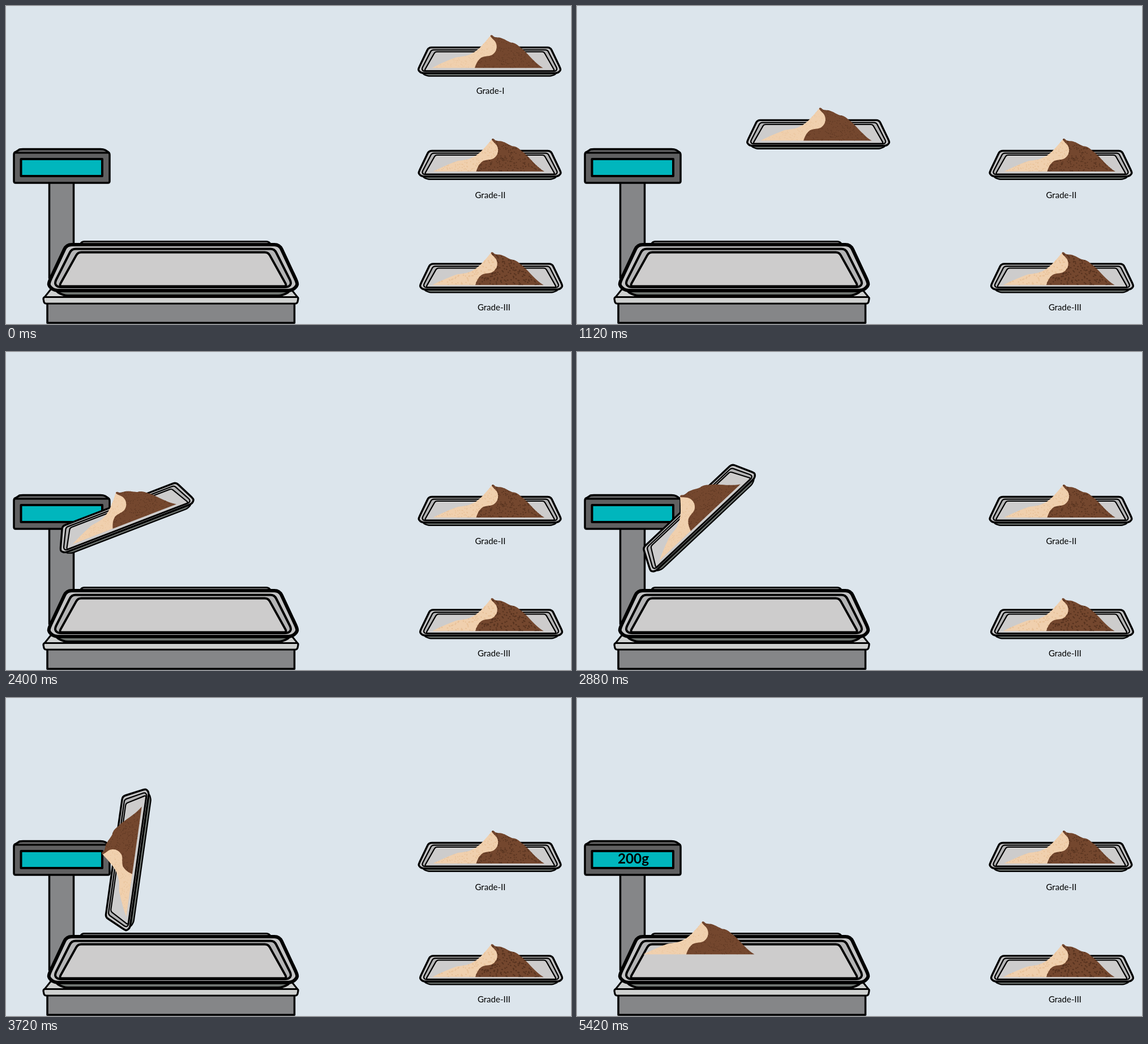
These frames come from a looping animation (998 px wide and 561 px high, 5460 ms). An HTML page:

```html
<!DOCTYPE html>
<html lang="en">
<head>
<meta charset="utf-8">
<title>Weighing a sample</title>
<style>
  html, body { margin: 0; width: 100%; height: 100%; overflow: hidden; background: #dce5ec; }
  svg { display: block; width: 100vw; height: 100vh; }
  text { font-family: Lato, "Open Sans", sans-serif; font-size: 15px; text-anchor: middle; }
  .line { stroke: #000; stroke-linejoin: round; stroke-linecap: round; }
</style>
</head>
<body>
<svg viewBox="0 0 998 561">
  <defs>
    <path id="light" d="M752 109.3 C764 103 778 97 790 92.5 C797 89 806 90 814 87.5 C828 83 836 75 843 67 C849 61 853 55 857 51 L868 66 L868 84 L838 109.3 Z"/>
    <path id="dark" d="M855.5 53 C856 50.5 859 50.5 861 53.5 C865 56.5 871 54.5 876 57 C882 59 887 63 892 64.5 C899 65 903 68 907 72 C916 78 922 86 929 93 C935 99 941 105 948.5 109.3 H828 C830 103 832 98 837 93 C843 87 852 90 859 86 C866 81 868 74 866 67 C864 60 858 58 855.5 53 Z"/>
    <clipPath id="lightClip"><use href="#light"/></clipPath>
    <clipPath id="darkClip"><use href="#dark"/></clipPath>
    <g id="tray"></g>
    <g id="smallTray"><use href="#tray" transform="translate(727 71.500) scale(.572 .56) translate(-73 -418)"/></g>
  </defs>

  <rect width="998" height="561" fill="#dce5ec"/>

  <g class="line">
    <path d="M76.500 310 H119.500 V425 L76.500 480 Z" fill="#858688" stroke-width="3.500"/>
    <path d="M14 262 Q14 258 18 257 L24 253 Q26 252.500 30 252.500 H167 Q172 252.500 175 254 L181 258 Q183 259 183 263 V309 Q183 312 180 312 H17 Q14 312 14 309 Z" fill="#606061" stroke-width="3.500"/>
    <path d="M17 259 H181" fill="none" stroke-width="3"/>
    <rect x="26.500" y="270" width="143.500" height="30" fill="#00b6bd" stroke-width="4"/>
    <path d="M131 421 Q133 415.500 138 415.500 H460 Q465 415.500 468 421 Z" fill="#a9aaab" stroke-width="3"/>
    <path d="M79 500 H504 L516 515 H67 Z" fill="#ced0cf" stroke-width="3"/>
    <rect x="73" y="523" width="436.500" height="36" fill="#858688" stroke-width="3.500"/>
    <path d="M69 513.500 H514 Q516 513.500 516 517 L515 522 Q514 525 511 525 H71 Q68 525 67 522 L66 517 Q66 513.500 69 513.500 Z" fill="#ced0cf" stroke-width="3.200"/>
  </g>
  <use href="#tray"/>

  <use href="#smallTray" x=".5" y="182.300"/>
  <g id="pile2" transform="translate(2.500 182.700)"></g>
  <use href="#smallTray" x="3" y="381.700"/>
  <g id="pile3" transform="translate(1 383)"></g>

  <text id="label1" x="855.500" y="154.500">Grade-I</text>
  <text x="855.500" y="339">Grade-II</text>
  <text x="862" y="537">Grade-III</text>

  <g id="sample">
    <use href="#smallTray"/>
  </g>
  <g id="pile1"></g>
  <g id="poured" transform="translate(-635 343)"></g>
  <text id="reading" x="99.500" y="292" style="font-size:24.300px;font-weight:700">200g</text>
</svg>
<script>
const $ = id => document.getElementById(id);
const clamp = v => Math.min(1, Math.max(0, v));

// Closed symmetric outline with rounded corners; points are [half width, y] down the right side
function outline(side, r) {
  const mid = 295;
  const pts = [...side.map(([w, y]) => [mid + w, y]),
               ...side.slice().reverse().map(([w, y]) => [mid - w, y])];
  const toward = (a, b) => {
    const k = Math.min(.5, r / Math.hypot(b[0] - a[0], b[1] - a[1]));
    return [a[0] + (b[0] - a[0]) * k, a[1] + (b[1] - a[1]) * k];
  };
  return pts.map((p, i) => {
    const prev = pts[(i + pts.length - 1) % pts.length], next = pts[(i + 1) % pts.length];
    return `${i ? 'L' : 'M'}${toward(p, prev)}Q${p} ${toward(p, next)}`;
  }).join('') + 'Z';
}

const layer = (side, r, fill, width) =>
  `<path class="line" d="${outline(side, r)}" fill="${fill}" stroke-width="${width}"/>`;

$('tray').innerHTML =
  layer([[208, 500], [203, 506], [190, 511]], 4, '#6f7571', 4) +
  layer([[188, 421], [219.5, 488], [219, 494], [210, 502]], 9, '#c4c4c5', 6) +
  layer([[179, 428.5], [209.5, 489], [204, 496]], 7, '#b4b4b5', 4) +
  layer([[168, 434.5], [201.5, 494.5]], 6, '#cdcccc', 3.8);

function random(seed) {
  return () => (seed = (seed * 16807) % 2147483647) / 2147483647;
}

function specks(count, seed) {
  const rnd = random(seed);
  let d = '';
  for (let i = 0; i < count; i++)
    d += `M${(750 + rnd() * 200).toFixed(1)} ${(51 + rnd() * 58).toFixed(1)}l${(rnd() * .8).toFixed(1)} .3`;
  return d;
}

function pile(count, size, seed) {
  const d = specks(count, seed);
  const dots = (clip, color) =>
    `<g clip-path="url(#${clip})"><path d="${d}" stroke="${color}" stroke-width="${size}" stroke-linecap="round"/></g>`;
  return '<use href="#light" fill="#f0d0ae"/>' + dots('lightClip', '#e8c198') +
         '<use href="#dark" fill="#74472e"/>' + dots('darkClip', '#57331f');
}

$('pile1').innerHTML = $('poured').innerHTML = pile(620, 1, 4711);
$('pile2').innerHTML = pile(560, 1.6, 1234);
$('pile3').innerHTML = pile(460, 2.2, 9182);

const LOOP = 5460;
const MOVE = { start: 115, length: 1713, dx: -649, dy: 194.5 };
const TURN = { start: 1945, length: 1950, angle: -90 };
const SINK = { start: 3920, length: 1000, drop: 56 };
const POURED = 4880, CLEARED = 5420;

const progress = (t, part) => clamp((t - part.start) / part.length);
const ease = p => p < .5 ? 2 * p * p : 1 - 2 * (1 - p) * (1 - p);
const show = (id, on) => $(id).setAttribute('visibility', on ? 'visible' : 'hidden');

function draw(t) {
  const u = ease(progress(t, MOVE));
  const angle = TURN.angle * progress(t, TURN);
  const sink = progress(t, SINK);
  const pose = `translate(${MOVE.dx * u} ${MOVE.dy * u}) rotate(${angle} 854 87.5)`;

  $('sample').setAttribute('transform', pose);
  $('pile1').setAttribute('transform', `translate(0 ${SINK.drop * sink}) ${pose}`);
  $('pile1').setAttribute('opacity', 1 - sink);

  show('label1', t < 40);
  show('sample', t < CLEARED);
  show('pile1', t < POURED);
  show('poured', t >= POURED);
  show('reading', t >= POURED);
}

const begin = performance.now();
function tick() {
  draw((performance.now() - begin) % LOOP);
  requestAnimationFrame(tick);
}
tick();
</script>
</body>
</html>
```
